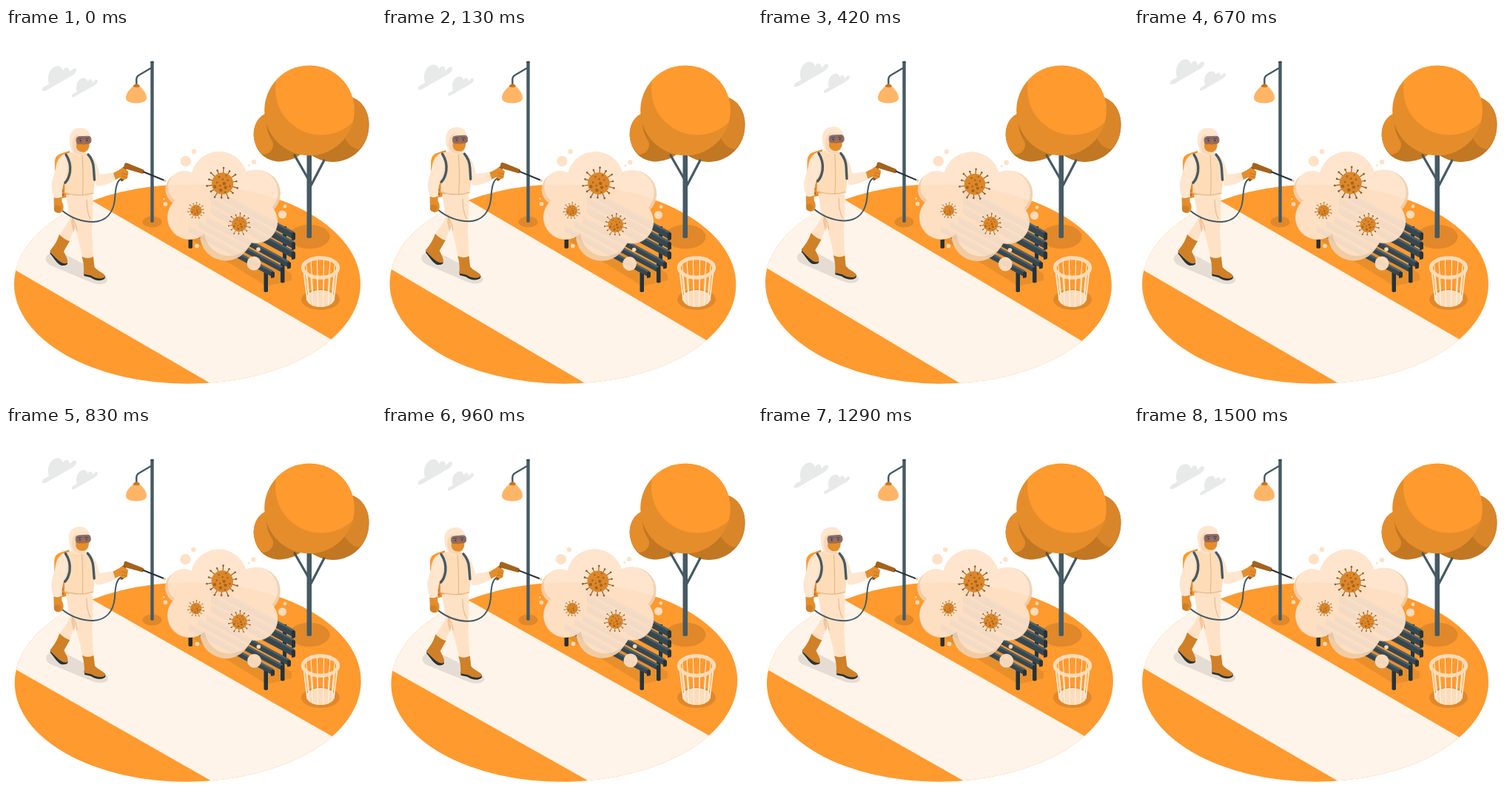
An HTML page that plays this animation: 500 px wide and 500 px high, repeating every 1540 ms.

```html
<!DOCTYPE html>
<html lang="en">
<head>
<meta charset="utf-8">
<title>Park disinfection</title>
<style>
html, body { margin: 0; height: 100%; overflow: hidden; background: #fff; }
svg { display: block; width: 100vw; height: 100vh; }
.base { fill: #ff9a2e; }
.shade { fill: #e0882a; }
.mid { fill: #e58d2b; }
.deep { fill: #c27722; }
.boot { fill: #d08027; }
.steel { fill: #455a64; }
.dark { fill: #263238; }
.suit { fill: #ffdcb8; }
.leg { fill: #ffe2c6; }
.pale { fill: #ffe6cf; }
.fold { fill: #f0c79d; }
.line { fill: none; stroke-linecap: round; stroke-linejoin: round; }
.pipe { stroke: #455a64; }
.seam { stroke: #dfb488; stroke-width: 1; }
</style>
</head>
<body>
<svg viewBox="0 0 500 500">
  <defs>
    <clipPath id="ground"><ellipse cx="245" cy="346" rx="234" ry="134.7"/></clipPath>
    <clipPath id="crown"><circle cx="410" cy="111.5" r="60.8"/></clipPath>
    <path id="puff" fill="#e8e9e9" d="M49,83C50,79 55,79 58,76C55,67 58,56 66,52.500C73,50 76,54 77,58C80,53 85,52 86,60C90,55 94,53 95,57C95,61 91,64 87,66L55,84.500C50,87 48,86 49,83Z"/>
  </defs>

  <g id="sky">
    <use href="#puff"/>
    <use href="#puff" transform="translate(51.8 28.7) scale(.76)"/>
  </g>

  <g class="wind">
    <ellipse class="base" cx="245" cy="346" rx="234" ry="134.700"/>
    <path clip-path="url(#ground)" fill="#fff4ea" d="M-30,302.500L310,499.700L520,467.400L60,200.600Z"/>
  </g>

  <!-- lamp -->
  <ellipse class="shade" cx="197.500" cy="262" rx="13" ry="7.600"/>
  <path class="steel" d="M195.300,45.500q2.200,-1.500 4.400,0V262q-2.200,1.800 -4.400,0Z"/>
  <path fill="#37474f" d="M195.300,45.500q2.200,-1.500 4.400,0v1.500h-4.400Z"/>
  <path class="line pipe" stroke-width="2.400" d="M197,53.500L180,63.500Q176.300,65.500 176.300,70V77"/>
  <path fill="#ffb566" d="M171.500,79C167,83 162,88 162,94.500C162,99 168,101.500 176,101.500C184,101.500 190,99 190,94.500C190,88 185,83 181,79Z"/>
  <path class="deep" d="M171.500,79Q173,75.500 176.300,75.500Q180,75.500 181,79Q176,81.500 171.500,79Z"/>

  <!-- tree -->
  <ellipse class="shade" cx="410" cy="282" rx="27.500" ry="16.300"/>
  <path class="deep" d="M353,115C338,120 332,138 336,153C340,172 356,181 371,180.500C385,179 394,175 400,169L360,112Z"/>
  <path class="mid" d="M352,115.500C338,120 332,138 336,153C338,162 343,168 348,171C357,170 362,163 361,156C359,148 350,144 352,115.500Z"/>
  <path class="deep" d="M465,93C484,98 493,118 490,138C486.500,165 464,181 442,181C430,181 420,177 410,170Z"/>
  <path fill="#d98529" d="M465,93C484,98 493,118 490,138C488.500,150 484,158 477,164C468,163 460,155 456,145Z"/>
  <path class="line pipe" stroke-width="3.200" d="M390,172L409.500,206M429.800,179L411,215"/>
  <path class="steel" d="M406.500,160H413V283q-3.200,2 -6.500,0Z"/>
  <circle class="mid" cx="410" cy="111.500" r="60.800"/>
  <circle class="base" cx="426" cy="82.500" r="62" clip-path="url(#crown)"/>

  <g id="bench"></g>

  <!-- bin -->
  <ellipse class="shade" cx="425" cy="367" rx="26" ry="14"/>
  <ellipse fill="#fbdcbb" cx="425" cy="365.500" rx="19" ry="11.500"/>
  <path id="bars" class="line" stroke="#fff0e0" stroke-width="1.100"/>
  <ellipse cx="425" cy="324" rx="23.700" ry="13.200" fill="none" stroke="#ffdcb8" stroke-width="5"/>

  <g class="wind">
    <g id="mist" opacity=".94"></g>
    <g id="germs"></g>

    <!-- worker -->
    <path fill="#e5ddd4" d="M55,308C62,301 76,305 84,308L131,333C140,338 139,345 129,346C122,347 113,343 106,340L61,321C54,318 52,312 55,308Z"/>
    <path class="mid" d="M66,180Q67,172 74,170L86,166V228L76,230L66,200Z"/>
    <path class="base" d="M66,180Q67,172 74,170L82,167L74,178L72,202L66,203Z"/>
    <path class="line" stroke="#a5621c" stroke-width="2.400" d="M76,213v1M76,219v1M76.500,225v1"/>
    <path class="leg" d="M81,225L104,228L95,266C91,276 87,283 85,290L71,281C77,272 84,264 86,257Z"/>
    <path class="fold" d="M94,232L96,264L91,276L88,262Z"/>
    <path class="leg" d="M86,225L117,226C118,244 117,262 116,275L118,310Q110,313 103,310C100,290 93,272 91,258Z"/>
    <path class="line seam" d="M109,232Q109,248 114,258M90,258Q94,262 96,274"/>

    <path class="dark" d="M60,300L59.500,305C65,311 69,319 75,321Q84,321.500 83,317Z"/>
    <path class="boot" d="M72,279Q79,286 86,288L78,302C82,310 85,315 82,318C75,320 68,311 60,303.500C59,298 66,297 72,279Z"/>
    <path class="dark" d="M105,330L105.500,335L114,337C122,343 133,342 134,337L133,334Z"/>
    <path class="boot" d="M102.500,309Q110,313 118,309L119.500,323C124,329 133,331 134,335.500C132,340 121,339 115,334.500L105,332.500Q106,320 102.500,309Z"/>

    <path class="suit" d="M77,174C84,167 92,167 100,168C108,168 114,170 118,177C122,190 121,205 118,225Q99,231 79,223C81,208 76,192 77,174Z"/>
    <path class="pale" d="M112,171C121,174 124,188 127,198L147,195Q150,200 148,206C140,210 128,215 122,213C118,206 119,190 112,171Z"/>
    <path class="pale" d="M83,169C72,171 68,181 67,190L62,208C61,218 63,224 65,229L76,228C75,215 80,205 82,196C84,188 86,177 83,169Z"/>
    <path class="line seam" d="M103,172Q105,200 103.500,226M79,222Q98,229 118,223"/>
    <path class="line pipe" stroke-width="3.400" stroke-linecap="butt" d="M81,171Q88,182 86.500,194Q85,204 80,209M111,171Q118,179 118.500,190L119.500,205"/>

    <path class="pale" d="M90,168C86,161 85,152 86,146C88,138 94,135 101,135C109,135 114,141 114.500,149L111,166C107,173 94,174 90,168Z"/>
    <path class="fold" d="M98,143C94,149 94,160 97,166L109,170Q98,173 92,168C87,155 90,146 98,143Z" opacity=".45"/>
    <path class="mid" d="M95,154L112.500,155Q113.500,164 107,167.500Q97,169 95,161Z"/>
    <rect x="95" y="146.500" width="20" height="10" rx="4" fill="#876a6c" stroke="#9c714c" stroke-width="1" transform="rotate(-3 105 152)"/>
    <path fill="#b96c31" d="M104,152L106.500,152L107,157.500H103Z"/>
    <circle cx="100.500" cy="152.500" r=".9" fill="#382d40"/>
    <circle cx="109.500" cy="152" r=".9" fill="#382d40"/>
    <path class="line" stroke="#4b394a" stroke-width=".9" d="M98,150l4,-.5M107.500,149.200l4,.3"/>

    <path class="line pipe" stroke-width="2" d="M75,246C88,257 103,262 118,262C136,261 145,249 147,232C148,217 149,206 157,203"/>
    <path class="mid" d="M64.500,229Q70,231 75.500,228L75.500,235C79,240 78,247 75,249Q69,252 65,246Z"/>
    <path class="boot" d="M65,241Q71,238 75,243L72,249.500Q66,250 65,246Z"/>
    <path fill="#8c5118" d="M157,189L163,185L161,203Q158,208 155,207Z"/>
    <path fill="#a5621c" d="M160,184Q161,181 165,183L186,191.500Q188,194 185,197L164,191Q158,190 160,184Z"/>
    <path class="mid" d="M145,196L154,191Q158,187 161,191Q167,193 165,197L164,203Q159,207 154,202L148,205Z"/>
    <path class="line" stroke="#c27722" stroke-width="1" d="M157,196l7,2M157,200l6,2"/>
    <path class="line" stroke="#263238" stroke-width="2" d="M186,194.500L213,205.500"/>
    <circle class="fold" cx="215" cy="206.500" r="1.800"/>
  </g>
</svg>
<script>
const LOOP = 1540, CYCLE = 1500, LEAD = 40;
const el = id => document.getElementById(id);
const dot = (x, y, r, fill) => `<circle cx="${x}" cy="${y}" r="${r}" fill="${fill}"/>`;
const dots = (list, fill) => list.map(([x, y, r]) => dot(x, y, r, fill)).join("");

// A slat runs up and left from its right end
function slat(x, y, len, h) {
  const a = x - len, b = y - len * 0.54;
  const face = (dy, size, fill) =>
    `<path fill="${fill}" d="M${a},${b + dy}L${x},${y + dy}v${size}L${a},${b + dy + size}Z"/>`;
  return face(0, h, "#37474f") + face(-1, 3, "#4c626d") +
    `<path class="dark" d="M${x - 3},${y + 1}l3,-1q2,.5 2,2v${h - 3.5}q0,1.5 -1.5,2l-3.500,.5Z"/>`;
}

function drawBench() {
  const leg = (x, y, h) => `<path class="dark" d="M${x},${y}h5.500v${h}q-2.700,1.800 -5.500,0Z"/>`;
  return `<path fill="#e88f2c" d="M228,272L262,258L386,332V341L352,349Z"/>` +
    leg(246.5, 284, 13) + leg(371, 318, 25.5) +
    `<path class="dark" d="M374,268h5v50h-5Z"/>` +
    slat(389, 276, 112, 10) + slat(389, 289, 112, 10) + slat(389, 302, 112, 10) +
    slat(383, 316, 112, 8.5) + slat(374, 323, 114, 8) +
    leg(348.5, 330, 26) + slat(361, 329, 114, 8);
}

function drawBars() {
  let d = "";
  for (let i = 0; i < 16; i++) {
    const a = (i + 0.5) * Math.PI / 8, c = Math.cos(a), s = Math.sin(a);
    d += `M${425 + 23.5 * c},${325 + 13 * s}L${425 + 18.5 * c},${365.5 + 11 * s}`;
  }
  return d;
}

function drawMist() {
  const back = [[288, 205, 38], [339.5, 223.5, 31.5], [338, 262, 29], [297, 279.5, 35], [248, 256, 30], [238, 218, 22.5]];
  const front = [[288, 205, 38], [337, 222, 30.5], [338, 261, 29], [302, 274, 34], [248.5, 255.5, 30], [241, 215, 22], [294, 240, 44]];
  const drops = [[243, 180, 7.2], [254, 167, 3.2], [335, 181, 3.2], [328.5, 185.5, 1.5], [373.5, 252, 5.6], [377, 241, 2.4],
    [335, 318, 9.4], [341, 299, 2.8], [258, 294.5, 2.8], [215.5, 238, 2.8], [213.5, 231, 1.3]];
  return dots(back, "#f1d0ad") + dots(front, "#ffe4cc") + dots(drops, "#ffe0c3");
}

function drawGerm(x, y, r, n) {
  let spikes = "", tips = "", spots = "";
  for (let i = 0; i < n; i++) {
    const a = (i / n) * Math.PI * 2 - 1.5, len = r * (i % 2 ? 1.3 : 1.45);
    const px = x + len * Math.cos(a), py = y + len * Math.sin(a);
    spikes += `M${x},${y}L${px},${py}`;
    tips += dot(px, py, r * 0.09, "#985a1b");
  }
  for (let i = 0; i < 12; i++) {
    const a = i * 2.4, d = r * 0.25 * Math.sqrt(i + 0.4);
    spots += dot(x + d * Math.cos(a), y + d * Math.sin(a), r * (i % 3 ? 0.09 : 0.15), "#a8641f");
  }
  return `<path d="${spikes}" stroke="#985a1b" stroke-width="${r * 0.08}"/>` + tips + dot(x, y, r, "#dc8729") + spots;
}

el("bench").innerHTML = drawBench();
el("bars").setAttribute("d", drawBars());
el("mist").innerHTML = drawMist();
el("germs").innerHTML = drawGerm(292.7, 209.5, 15, 14) + drawGerm(256, 247, 7.8, 14) + drawGerm(316.2, 265.8, 10.5, 14);

// Linear interpolation over [position, value] steps
function track(steps, p) {
  const i = Math.max(1, steps.findIndex(s => s[0] >= p));
  const [a, u] = steps[i - 1], [b, v] = steps[i];
  return u + (v - u) * (p - a) / (b - a);
}

const sway = [[0, 0], [0.25, 1], [0.75, -1], [1, 0]];
const lift = [[0, 0], [0.5, -10], [1, 0]];
const pulse = [[0, 0.975], [250, 1], [420, 0.95], [670, 1], [830, 0.975], [1130, 0.95], [LOOP, 0.95]];
const windy = document.querySelectorAll(".wind");
const rest = track(sway, LEAD / CYCLE); // tilt already in the drawn pose

function draw(now) {
  const t = now % LOOP;
  const p = ((Math.min(t, CYCLE) + LEAD) / CYCLE) % 1;
  const turn = `rotate(${track(sway, p) - rest} 250 250)`;
  windy.forEach(g => g.setAttribute("transform", turn));
  el("sky").setAttribute("transform", `translate(0 ${track(lift, p)})`);
  el("germs").setAttribute("transform", `translate(288 236) scale(${track(pulse, t)}) translate(-288 -236)`);
}

const start = performance.now();
function tick() {
  draw(performance.now() - start);
  requestAnimationFrame(tick);
}
tick();
</script>
</body>
</html>
```
